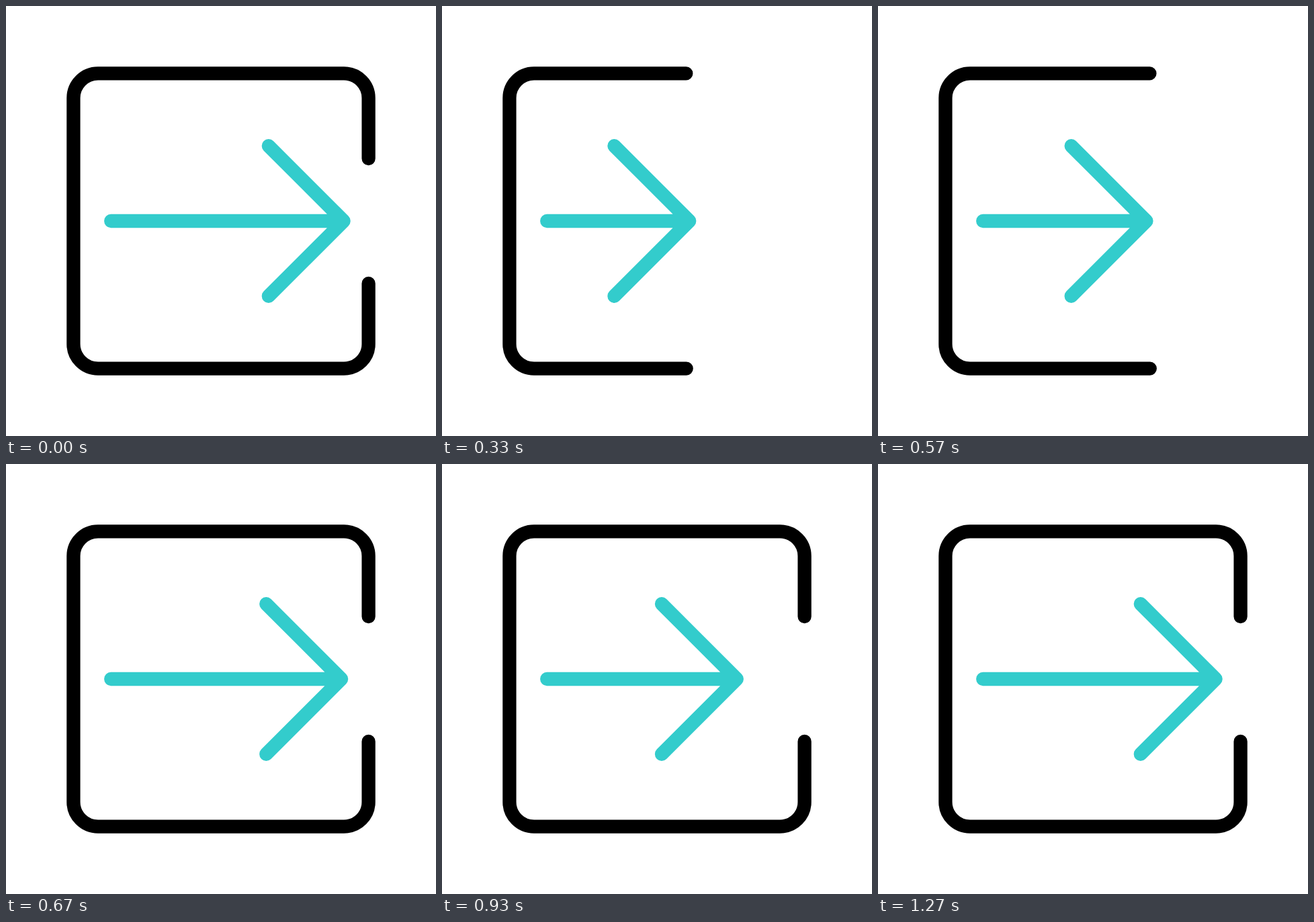
Recreate the animation shown at these times as an HTML page. Size 640 by 640 pixels, loop 2 s.

```html
<!DOCTYPE html>
<html lang="en">
<head>
<meta charset="utf-8">
<title>Exit icon</title>
<style>
  html, body { margin: 0; width: 100%; height: 100%; overflow: hidden; background: #fff; }
  svg { display: block; width: 100%; height: 100%; }
  path { fill: none; stroke-width: 20.3; stroke-linecap: round; stroke-linejoin: round; }
</style>
</head>
<body>
<svg viewBox="0 0 640 640">
  <path id="box" stroke="#000" d="M539.6 227V137A36.6 36.6 0 0 0 503 100.4H137A36.6 36.6 0 0 0 100.4 137V503A36.6 36.6 0 0 0 137 539.6H503A36.6 36.6 0 0 0 539.6 503V413"/>
  <path id="arrow" stroke="#33cccc"/>
</svg>
<script>
const LOOP = 2000;
const box = document.getElementById('box');
const arrow = document.getElementById('arrow');
const boxLen = box.getTotalLength();

// keys: [step, value]; soft: length of the ease handles
const trim = { soft: 0.19, keys: [[0, 0], [15, 408.3], [19.8, 0]] };
const pull = { soft: 0.215, keys: [[0, 0], [15, 189.5], [19.3, 0], [26, 71.3], [38, 0]] };

// cubic-bezier(g, 0, 1 - g, 1), solved by bisection
function ease(x, g) {
  let lo = 0, hi = 1, u = 0.5;
  for (let i = 0; i < 24; i++) {
    u = (lo + hi) / 2;
    const v = 1 - u;
    const bx = 3 * u * v * (v * g + u * (1 - g)) + u * u * u;
    if (bx < x) lo = u; else hi = u;
  }
  return u * u * (3 - 2 * u);
}

function valueAt({ soft, keys }, n) {
  for (let i = 1; i < keys.length; i++) {
    const [n0, a] = keys[i - 1], [n1, b] = keys[i];
    if (n < n1) return a + (b - a) * ease((n - n0) / (n1 - n0), soft);
  }
  return keys[keys.length - 1][1];
}

// thirty steps a second, on 10 ms ticks
function stepAt(t) {
  const r = t % 100;
  return 3 * Math.floor(t / 100) + (r >= 70 ? 2 : r >= 30 ? 1 : 0);
}

function draw(t) {
  const n = stepAt(t);
  const cut = valueAt(trim, n);
  box.setAttribute('stroke-dasharray', cut ? `${boxLen - 2 * cut} ${boxLen}` : 'none');
  box.setAttribute('stroke-dashoffset', -cut);

  const tip = 502.6 - valueAt(pull, n);
  const back = tip - 111.8;
  arrow.setAttribute('d', `M156.2 320H${tip}M${back} 208.2L${tip} 320L${back} 431.8`);
}

const start = performance.now();
function tick() {
  draw((performance.now() - start) % LOOP);
  requestAnimationFrame(tick);
}
draw(0);
requestAnimationFrame(tick);
</script>
</body>
</html>
```
